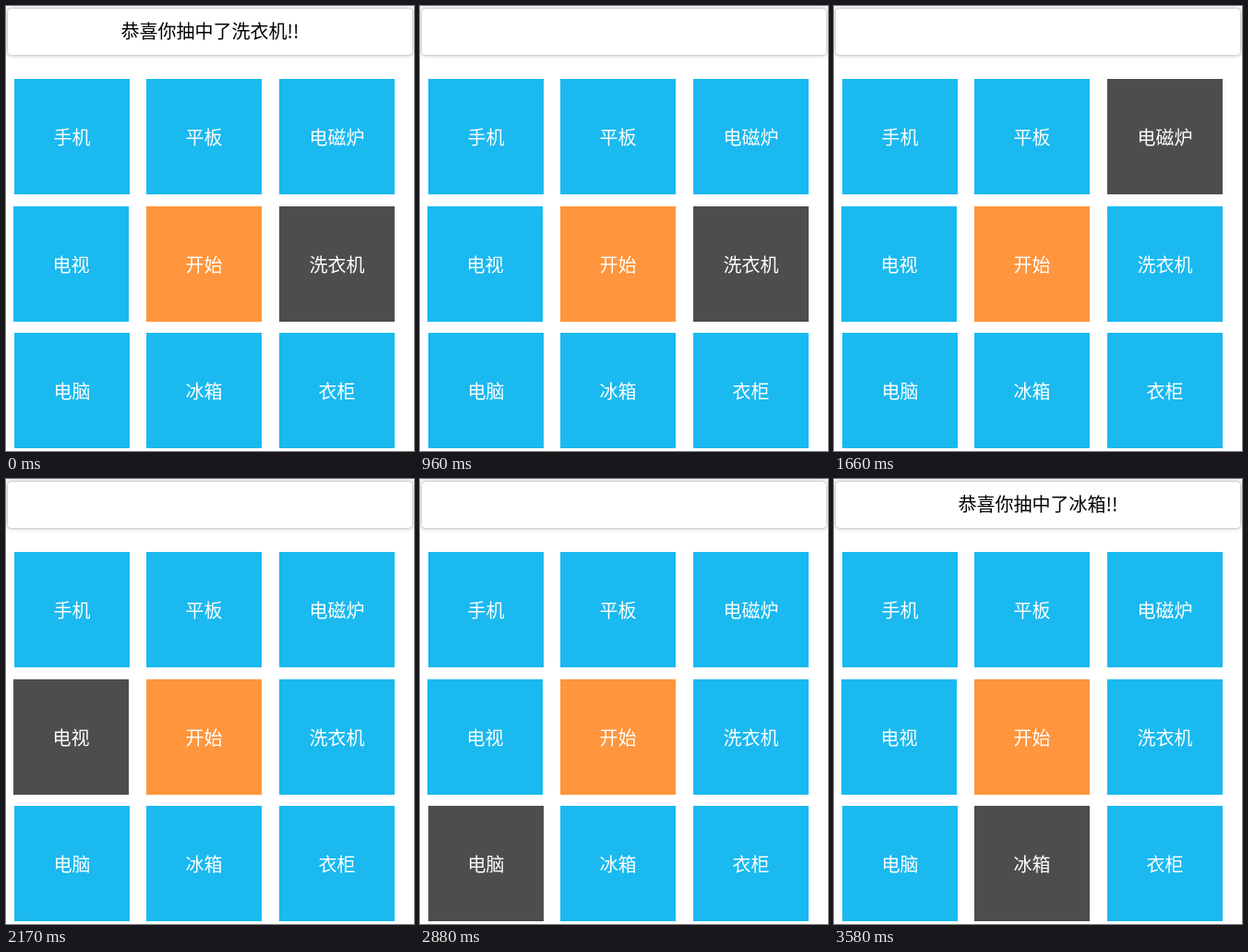
These frames come from a looping animation (442 by 482 pixels, 4.06 s). An HTML page:

```html
<!DOCTYPE html>
<html lang="zh-CN">
<head>
<meta charset="utf-8">
<style>
html, body { margin: 0; width: 100%; height: 100%; overflow: hidden; background: #fff; }
body { position: relative; font: 300 20px "Noto Sans CJK SC", "Noto Sans CJK", sans-serif; text-align: center; }
div { position: absolute; white-space: nowrap; }
#title {
  left: 2px; top: 3px; width: 438px; height: 50px; line-height: 48px;
  border-radius: 3px; box-shadow: 0 0 1px #888, 0 0 5px #aaa; color: #000;
}
.tile { width: 125px; height: 125px; line-height: 125px; background: #1ab9ef; color: #fff; }
.start { background: #ff953c; }
.on { background: #4d4d4d; }
</style>
</head>
<body>
<div id="title"></div>
<script>
const LOOP = 4060, START = 540, STEPS = 30;
const names = ['手机', '平板', '电磁炉', '电视', '开始', '洗衣机', '电脑', '冰箱', '衣柜'];
const ring = [0, 1, 2, 5, 8, 7, 6, 3]; // clockwise around the start button
const late = [1, 3, 12, 22];           // ticks that arrive 10 ms late
const title = document.getElementById('title');

const tiles = names.map((name, i) => {
  const tile = document.createElement('div');
  tile.className = i === 4 ? 'tile start' : 'tile';
  tile.textContent = name;
  tile.style.left = (i === 3 ? 8 : [9, 152, 296][i % 3]) + 'px';
  tile.style.top = [79, 217, 354][Math.floor(i / 3)] + 'px';
  document.body.append(tile);
  return tile;
});

const tickTime = n => START + 100 * n + 10 * late.filter(k => n >= k).length;

function draw(t) {
  let tick = -1;
  while (tick < STEPS && t >= tickTime(tick + 1)) tick++;
  const active = tick < 1 ? 5 : ring[(tick - 1) % 8];
  tiles.forEach((tile, i) => tile.classList.toggle('on', i === active));
  const done = tick < 0 || tick === STEPS;
  title.textContent = done ? `恭喜你抽中了${names[active]}!!` : '';
}

const origin = performance.now();
function frame() {
  draw((performance.now() - origin) % LOOP);
  requestAnimationFrame(frame);
}
frame();
</script>
</body>
</html>
```
